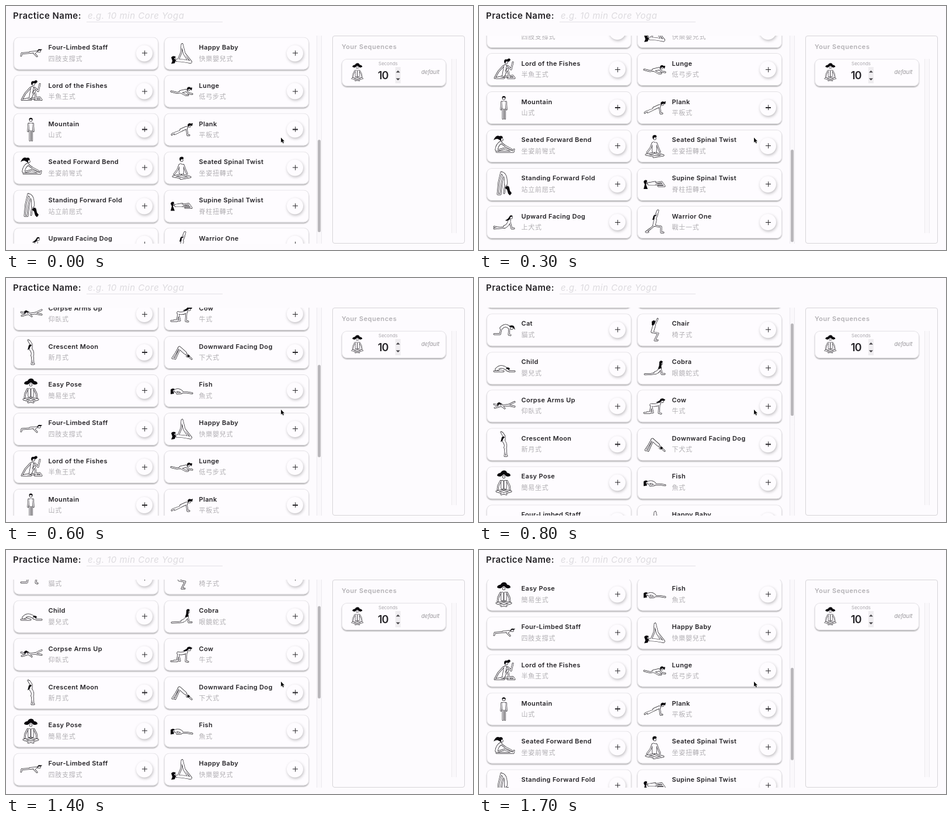
Write an HTML page that moves like this. It is 800 px wide and 420 px high and loops after 3 s.

```html
<!DOCTYPE html>
<html lang="en">
<head>
<meta charset="utf-8">
<title>Practice builder</title>
<style>
@property --s { syntax: "<number>"; inherits: true; initial-value: 392.5; }
html, body { margin: 0; width: 100%; height: 100%; overflow: hidden; }
body { position: relative; background: #fdfbfe; color: #242226; font: 600 11px/17px Inter, Roboto, sans-serif; }
body *, .plus::before, .plus::after { position: absolute; white-space: nowrap; }
#stage { width: 800px; height: 420px; overflow: hidden; animation: scroll 3s step-end infinite; }

/* --s is the scroll offset of the pose list */
@keyframes scroll {
  0% { --s: 392.5; }
  3.333% { --s: 435.5; }
  10% { --s: 430; }
  13.333% { --s: 390; }
  16.666% { --s: 310; }
  20% { --s: 214; }
  23.333% { --s: 119; }
  26.666% { --s: 55.7; }
  40% { --s: 57.5; }
  43.333% { --s: 68.5; }
  46.666% { --s: 96.5; }
  50% { --s: 156.5; }
  53.333% { --s: 243.5; }
  56.666%, 100% { --s: 331.5; }
}

h1 { margin: 0; left: 12px; top: 6.5px; font: 600 15px/20px Inter, Roboto, sans-serif; letter-spacing: .45px; }
.field { left: 138px; top: 7px; width: 231px; height: 20px; padding-left: 2px; box-shadow: 0 .5px #c9c7cb;
  font: italic 400 15px/20px Inter, Roboto, sans-serif; letter-spacing: .5px; color: #dddbdf; }

.view { left: 0; top: 51px; width: 530px; height: 358px; overflow: hidden; }
#list { left: 0; top: 0; transform: translateY(calc(var(--s) * -1px)); }
.card { width: 248.5px; height: 56px; border-radius: 9px; background: #fefcff;
  box-shadow: inset 0 0 0 1px #e3e1e5, 0 2px 2px rgba(0, 0, 0, .29); }
.card svg { left: 0; top: 0; }
.name { left: 60px; top: 9.5px; letter-spacing: .35px; }
.zh { left: 60px; top: 28px; font: 400 11px/16px "Noto Sans CJK TC", "Noto Sans CJK", sans-serif; letter-spacing: .75px; color: #b0aeb2; }
.plus { left: 210.6px; top: 14px; width: 28px; height: 28px; border-radius: 50%; background: #fefcff;
  box-shadow: 1px 2px 5px rgba(0, 0, 0, .25); }
.plus::before, .plus::after { content: ""; left: 9.5px; top: 13.4px; width: 9px; height: 1.3px; background: #2b292d; }
.plus::after { transform: rotate(90deg); }

.track { box-sizing: border-box; background: #faf8fb; border: solid #eceaee; border-width: 0 1px; }
.thumb { left: 534px; top: 52.85px; width: 5px; height: 159px; border-radius: 3px; background: #b9b7bb;
  transform: translateY(calc(var(--s) * .4515px)); }

.panel { box-sizing: border-box; left: 559px; top: 51px; width: 227px; height: 358px; border: 1px solid #d6d4d8; border-radius: 4px; }
.title { left: 575px; top: 61.5px; letter-spacing: .55px; color: #b3b1b5; }
.step { left: 574.5px; top: 90.5px; width: 179px; height: 47.5px; }
.unit { left: 638px; top: 91px; font-size: 8px; font-weight: 400; color: #a9a7ab; }
.count { left: 637px; top: 109px; font-size: 18px; line-height: 21px; letter-spacing: -.9px; }
.spin { left: 667px; top: 105px; width: 9px; height: 28px; background: #efedf0; }
.tag { left: 711.5px; top: 105px; font-size: 9.4px; font-style: italic; font-weight: 400; color: #99979b; }
.seat { left: 580.2px; top: 92.9px; }
</style>
</head>
<body>
<div id="stage">
  <h1>Practice Name:</h1>
  <div class="field">e.g. 10 min Core Yoga</div>

  <div class="view"><div id="list"></div></div>
  <div class="track" style="left:532px;top:51px;width:9px;height:358px"></div>
  <div class="thumb"></div>

  <div class="panel"></div>
  <div class="title">Your Sequences</div>
  <div class="card step"></div>
  <div class="seat" id="seat"></div>
  <div class="unit">Seconds</div>
  <div class="count">10</div>
  <div class="spin"><svg width="9" height="28" fill="#444246"><path d="M1 9.5L4.5 6L8 9.5ZM1 19.5L4.5 23L8 19.5Z"/></svg></div>
  <div class="tag">default</div>
  <div class="track" style="left:763px;top:91px;width:9px;height:300px"></div>

  <svg style="left:468.5px;top:225px" width="10" height="14"><path d="M2 1.5V10L4 8.2L5.4 11.4L6.9 10.7L5.5 7.7H8Z" fill="#111" stroke="#fff" stroke-width=".8" paint-order="stroke"/></svg>
</div>

<script>
// Each pose: name, translation, torso path, limb path, head centre, hair outline
const poses = [
  ["", ""], ["", ""],
  ["Cat", "貓式", "M25 25Q32 17 39 24", "M13 35.5H23L25 27M39 25L38 36L41 37", "43 25",
    "M39 21Q45 19 47 22L49 28L45 24Q42 23 40 24Z"],
  ["Chair", "椅子式", "M29 21L26 31", "M26 32L36 34L30 46H35M29 21L32 15L35 9", "28 16",
    "M25 14Q28 10 31 13L30 17L27 21L25 19Z"],
  ["Child", "嬰兒式", "M17 30Q24 22 34 29", "M13 33.5H29M18 30L27 33M34 29L39 33.5H48", "36 31",
    "M34 27Q39 26 40 29L38 31Q36 29 33 29Z"],
  ["Cobra", "眼鏡蛇式", "M31 36Q38 34 39 27", "M13 38.5L24 38L32 37M40 27L42 38H47", "41 20",
    "M38 17Q41 13 44 17L42 19L41 28L36 30Q38 24 38 17Z"],
  ["Corpse Arms Up", "仰臥式", "", "M13 25L24 28L38 26L48 21M24 28L14 31M25 27L31 32M37 27L48 29M24 28L36 27", "21 26",
    "M18 24Q21 20 24 23L28 25L22 25L19 28Z"],
  ["Cow", "牛式", "M24 26Q32 28 38 24", "M12 40H22L24 28M38 25L37 40L41 41M24 27L27 39H17", "43 20",
    "M39 18Q39 15 44 15L48 17L47 19L42 19Q38 24 32 22L36 20Z"],
  ["Crescent Moon", "新月式", "M29 22Q34 28 32 33", "M31 34Q33 40 31 48H35M33 34L34 47M29 21L29 14L25 7M31 21L31 14L27 8", "29 18",
    "M26 16Q29 13 31 16L28 19L27 22L24 24Z"],
  ["Downward Facing Dog", "下犬式", "M26 20L36 29", "M25 20L20 29L14 38H18M27 21L23 30L19 39M36 29L47 39.5", "40 34",
    "M39 33Q42 31 44 34L43 36L40 36Z"],
  ["Easy Pose", "簡易坐式", "M27 26V37M32 26V37", "M24 25L20 33L19 40M35 25L39 33L40 40M28 41L17 43L34 48M31 41L42 43L25 48", "29.5 18",
    "M26.5 16Q23 19 18 16Q18 12 24 11Q26 7 30 7Q34 7 35 11Q41 12 41 16Q36 19 32.5 16Q31 14 29.5 14Q28 14 26.5 16Z"],
  ["Fish", "魚式", "M19 28Q25 25 30 30", "M29 31L39 31L48 32.5M20 28L22 33L29 32.5", "15 28",
    "M11 26Q14 23 18 25L15 28L17 33L11 34Z"],
  ["Four-Limbed Staff", "四肢支撐式", "", "M13 32L14 28L28 27L39 25.5L35 28L40 33M28 26L40 25", "44 24",
    "M41 23Q42 20 46 21L49 21L47 23L43 23L40 25Z"],
  ["Happy Baby", "快樂嬰兒式", "M22 40Q32 40 45 43", "M46 42L35 28L31 12M41 40L34 29L30 13M24 39L29 27L30 14", "17 37",
    "M12 35Q15 31 20 34L17 37L20 40L18 45L12 46L14 41Z"],
  ["Lord of the Fishes", "半魚王式", "M32 22L29 38", "M29 22L20 32L14 43M36 22L42 28L45 16M29 40L16 43H30M30 39L36 27L39 43M31 41L45 39L48 43H36", "34 16",
    "M30 15Q30 10 35 11Q40 7 41 12L38 15Q35 14 34 14L31 18Z"],
  ["Lunge", "低弓步式", "M28 29L37 27", "M12 28.5L22 31L28 30L37 35H41M37 27L42 32L48 33", "42 25",
    "M39 23Q42 19 45 22L48 22L47 27L44 24L40 26Z"],
  ["Mountain", "山式", "M28.5 19V28M30.5 19V28", "M28 28V47M31.5 28V47M25.8 18L24.8 31M33.2 18L34.2 31", "29.5 12",
    "M26.5 12Q26 8 29.5 8Q33 8 32.7 12L31 10.5H28Z"],
  ["Plank", "平板式", "M29 29L38 25", "M13 37L15 35L29 30M18 36L30 30M38 25L40 38H43", "43 22",
    "M40 20Q42 16 46 18L49 17L48 22L45 21L41 23Z"],
  ["Seated Forward Bend", "坐姿前彎式", "M17 34Q18 26 24 22", "M17 36L31 32L46 38L47 34M17 38H46M24 22L32 28L43 34", "26 17",
    "M28 14Q27 9 22 11Q16 8 12 18Q18 14 21 17L25 19L25 15Z"],
  ["Seated Spinal Twist", "坐姿扭轉式", "M28 23V37M31 24V37", "M26 23L23 31L17 39M33 23L36 31L39 38M28 40L15 43L33 46M31 40L45 44L28 47", "30 15",
    "M26.5 15Q25 9 30 9Q34 9 33 13L29 13L28 16Z"],
  ["Standing Forward Fold", "站立前屈式", "M27 9Q34 12 33 28", "M25 7L21 24L19 45H24M29 10L26 26L24 44M32 28L30 43", "36 33",
    "M31 34Q36 28 39 34L40 39L43 43L40 47L37 44L35 37Z"],
  ["Supine Spinal Twist", "脊柱扭轉式", "M20 27H30", "M31 26L42 24L47 31L36 31M20 26L31 24M32 28H44", "15 25",
    "M11 24Q12 19 17 21L16 25L15 28L18 36H11L13 28Z"],
  ["Upward Facing Dog", "上犬式", "M31 36Q38 33 39 25", "M13 39L23 38L32 37M13 36L22 38M39 25L43 39H47", "42 20",
    "M40 17Q43 15 45 18L41 19L39 24Q34 27 32 25Q38 22 40 17Z"],
  ["Warrior One", "戰士一式", "M31 24L29 33", "M29 34L23 39L15 45H19M29 34L41 36L41 46H45M31 23L34 16L36 8M30 23L32 15L35 8", "31 19",
    "M28 17Q31 14 33 17L30 18L29 24L26 24Z"],
];

// Limbs are drawn as a dark stroke under a thinner light one, leaving an outline
const body = ([, , torso, limbs, head], color, cut) =>
  `<g fill="none" stroke="${color}" stroke-linecap="round" stroke-linejoin="round">
    <path d="${limbs}" stroke-width="${2.9 - cut}"/>
    <path d="${torso}" stroke-width="${5.2 - cut}"/>
    <path d="M${head}h.01" stroke-width="${5.2 - cut}"/></g>`;

const figure = (pose, scale = 1) => pose[0] &&
  `<svg width="${60 * scale}" height="${56 * scale}" viewBox="0 0 60 56">
    ${body(pose, "#1b191d", 0)}${body(pose, "#fefcff", 1.4)}
    <path d="${pose[5]}" fill="#0b090d"/></svg>`;

const card = (pose, i) =>
  `<div class="card" style="left:${i % 2 ? 270.5 : 12.5}px;top:${(i >> 1) * 65.75}px">${figure(pose)}
    <div class="name">${pose[0]}</div><div class="zh" lang="zh-Hant">${pose[1]}</div><div class="plus"></div></div>`;

document.getElementById("list").innerHTML = poses.map(card).join("");
document.getElementById("seat").innerHTML = figure(poses.find(p => p[0] === "Easy Pose"), .74);
</script>
</body>
</html>
```
